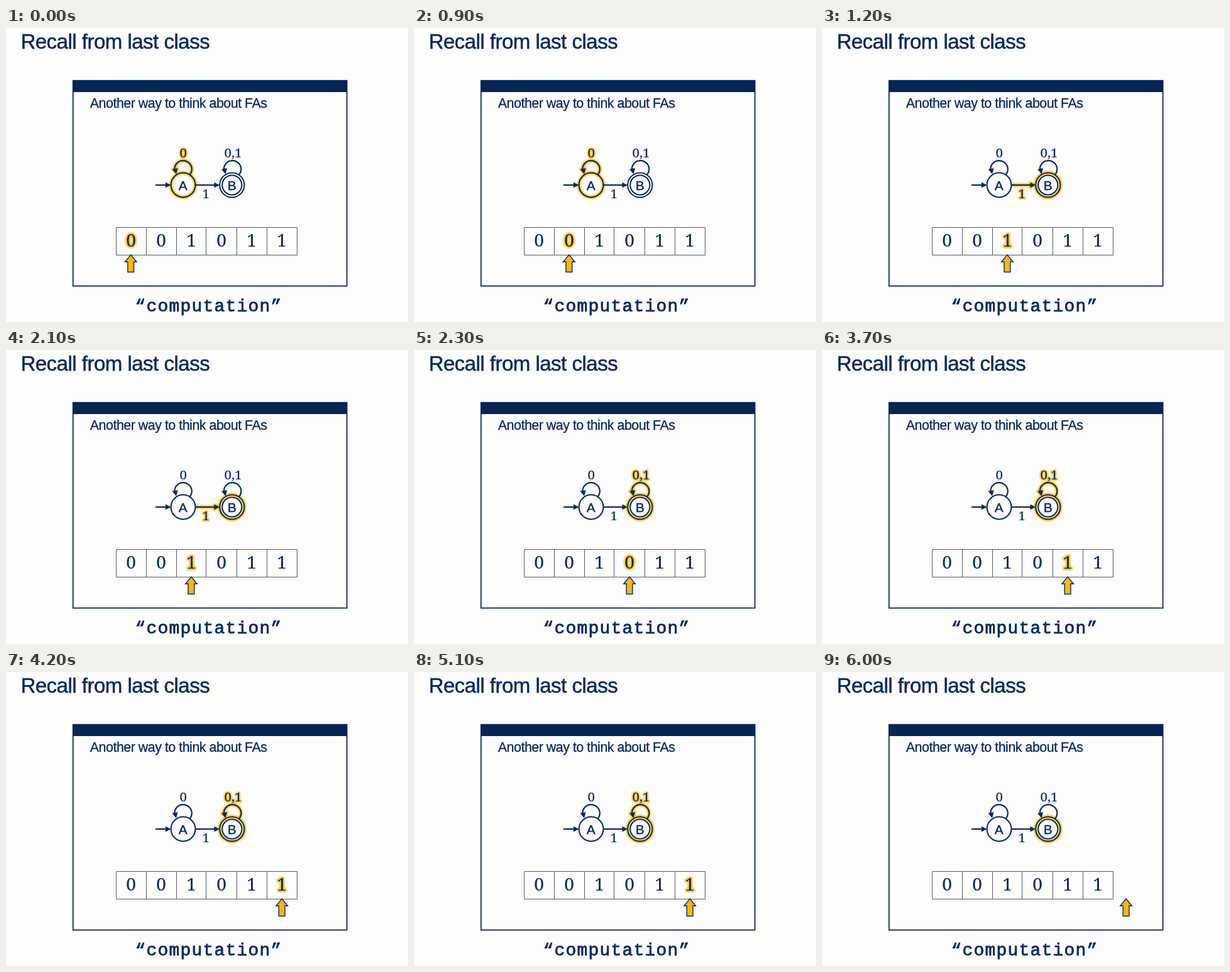
These frames come from a looping animation (640 by 468 pixels, 6100 ms). An HTML page:

```html
<!DOCTYPE html>
<html lang="en">
<head>
<meta charset="utf-8">
<title>Finite automaton</title>
<style>
@property --step { syntax: "<number>"; inherits: true; initial-value: 0; }

html, body { margin: 0; width: 100%; height: 100%; overflow: hidden; background: #fdfdfd; }
svg {
  --navy: #07285f;
  --gold: #ffc52e;
  display: block; width: 100%; height: 100%;
  font-family: "Liberation Sans", Arial, sans-serif;
  fill: var(--navy); stroke: var(--navy);
  animation: run 6100ms step-end infinite;
}

/* --step is the tape position being read; 6 is past the end */
@keyframes run {
  0%     { --step: 0; }
  3%     { --step: 1; }
  19.4%  { --step: 2; }
  35.8%  { --step: 3; }
  52.2%  { --step: 4; }
  68.6%  { --step: 5; }
  85%    { --step: 6; }
  100%   { --step: 6; }
}

text, .head { stroke-width: var(--edge, .15); stroke-linejoin: round; }
.line { fill: none; stroke-width: var(--line, 2.2); }
.ring { --line: 2; }
.glow { --edge: 4; --line: 6; fill: var(--gold); stroke: var(--gold); filter: blur(.8px); }
.mid { text-anchor: middle; }
.serif { font-family: "Noto Serif", Cambria, serif; }
.label { font-size: 20.5px; }
.state { --edge: .4; font-size: 21px; }
.digit { font-size: 28px; }
.title { --edge: .5; font-size: 33px; letter-spacing: -.5px; }
.subtitle { --edge: .3; font-size: 21.4px; letter-spacing: -.48px; }
.caption {
  --edge: .8; font-size: 28px; letter-spacing: 1.2px;
  font-family: "Liberation Mono", "Courier New", monospace;
}

.cell { --edge: 5.5; opacity: calc(1 - max(var(--step) - var(--i), var(--i) - var(--step))); }
.edge { opacity: calc(1 - max(var(--step) - 2, 2 - var(--step))); }
.in-a { opacity: calc(2 - var(--step)); }
.in-b { opacity: calc(var(--step) - 1); }
.stay-b { opacity: min(var(--step) - 2, 6 - var(--step)); }
.pointer { transform: translateX(min(var(--step) * 48.1px, 285.4px)); }
</style>
</head>
<body>
<svg viewBox="0 0 640 468">
  <text class="title" x="23.4" y="33">Recall from last class</text>

  <rect x="107" y="84" width="435.5" height="18" fill="#072452" stroke="none"/>
  <rect x="106.7" y="83.7" width="436" height="327" fill="none" stroke-width="1.8"/>
  <text class="subtitle" x="133.8" y="127">Another way to think about FAs</text>

  <g class="glow in-a">
    <use href="#loop-a"/><use href="#zero"/>
    <circle cx="282" cy="250" r="19.4" fill="none" stroke-width="6"/>
  </g>
  <g class="glow edge">
    <use href="#edge"/><use href="#one"/>
  </g>
  <g class="glow stay-b">
    <use href="#loop-a" x="78.5"/><use href="#both"/>
  </g>
  <circle class="glow in-b" cx="359.8" cy="250" r="19.8" fill-opacity="0" stroke-width="6"/>
  <circle cx="359.8" cy="250" r="15.6" fill="#fdfdfd" stroke="none"/>

  <g id="loop-a">
    <path class="line" d="M292 234C297 229 297 221 292.5 216C286.5 209.5 277 209.5 271.5 216C268.5 219.5 268 223 268.6 226"/>
    <path class="head" d="M264.6 224.8L273.4 223.2L271 232.4Z"/>
  </g>
  <use href="#loop-a" x="78.5"/>
  <text class="mid serif label" id="zero" x="282.3" y="206">0</text>
  <text class="mid serif label" id="both" x="361.5" y="206">0,1</text>

  <path class="line" d="M238 250H256"/>
  <path class="head" d="M254 245.8L262.5 250L254 254.2Z"/>
  <g id="edge">
    <path class="line" d="M302 250H334"/>
    <path class="head" d="M331.5 245.8L340 250L331.5 254.2Z"/>
  </g>
  <text class="mid serif label" id="one" x="318.3" y="271">1</text>

  <circle class="line ring" cx="282" cy="250" r="19.4"/>
  <circle class="line ring" cx="359.8" cy="250" r="19.6"/>
  <circle class="line ring" cx="359.8" cy="250" r="15.6"/>
  <text class="mid state" x="281.8" y="257.8">A</text>
  <text class="mid state" x="359.8" y="257.8">B</text>

  <path d="M175.5 317.5H463.5V361.5H175.5ZM223.5 318V361M271.5 318V361M318.5 318V361M367.5 318V361M415.5 318V361" fill="none" stroke="#555a62"/>
  <g id="tape"></g>

  <path class="pointer" d="M198.7 361L208 372.3H203.6V388.5H193.8V372.3H189.4Z" fill="#ffb511" stroke-width="1.4"/>

  <text class="mid caption" x="322.6" y="450.5">“computation”</text>
</svg>
<script>
  const digit = (d, i, cls) =>
    `<text class="mid serif digit ${cls}" style="--i:${i}" x="${199 + 48 * i}" y="348">${d}</text>`;
  document.getElementById("tape").innerHTML = [..."001011"]
    .map((d, i) => digit(d, i, "glow cell") + digit(d, i, "")).join("");
</script>
</body>
</html>
```
